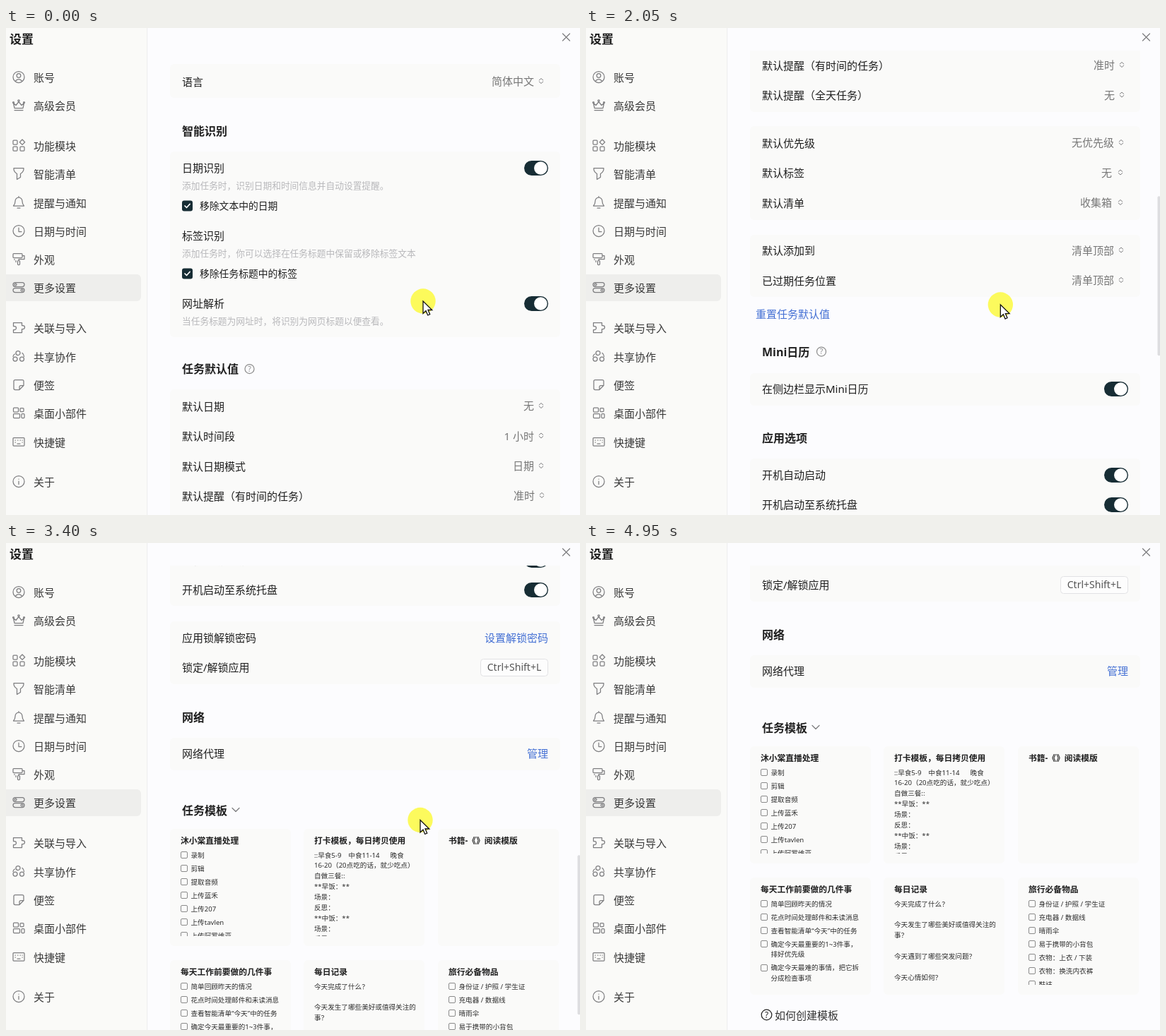
Recreate the animation shown at these times as an HTML page. Size 812 by 690 pixels, loop 5000 ms.

```html
<!DOCTYPE html>
<html lang="zh-CN">
<head>
<meta charset="utf-8">
<style>
html, body { margin: 0; width: 100%; height: 100%; overflow: hidden; background: #fcfcfe; }
svg { display: block; }
text { font-family: "Noto Sans", "Noto Sans CJK SC", "Noto Sans CJK", sans-serif; white-space: pre; }
.line { fill: none; stroke: #7e7e80; stroke-width: 1.25; stroke-linecap: round; stroke-linejoin: round; }
</style>
</head>
<body>
<svg id="stage" width="812" height="690" viewBox="0 0 812 690"></svg>
<script>
const INK = '#1f1f1f', GREY = '#777', PALE = '#b8b8bb', BLUE = '#4470d4', DARK = '#172d35', CARD = '#fafaf9';

// y is the visual middle of the text line; baselines sit on whole pixels
const text = (x, y, str, { size = 15, fill = INK, weight = 400, anchor = 'start' } = {}) =>
  `<text x="${x}" y="${Math.round(y + size * 0.38)}" font-size="${size}" fill="${fill}" font-weight="${weight}" text-anchor="${anchor}">${str}</text>`;
const rect = (x, y, w, h, r, fill, extra = '') =>
  `<rect x="${x}" y="${y}" width="${w}" height="${h}" rx="${r}" fill="${fill}" ${extra}/>`;
const line = (x, y, d, style = '') =>
  `<path class="line" transform="translate(${x} ${y})" d="${d}" style="${style}"/>`;
const ring = (x, y, r) => `M${x - r} ${y}a${r} ${r} 0 1 0 ${2 * r} 0a${r} ${r} 0 1 0 ${-2 * r} 0z`;
const box = (x, y, w, h) => `M${x + 1} ${y}h${w - 2}q1 0 1 1v${h - 2}q0 1 -1 1h${2 - w}q-1 0 -1 -1v${2 - h}q0 -1 1 -1z`;
const pill = y => `M-5 ${y - 3}H5a3 3 0 0 1 0 6H-5a3 3 0 0 1 0 -6z`;

const menu = [
  [70, '账号', ring(0, 0, 8) + ring(0, -2, 2.8) + 'M-5 6Q0 0 5 6'],
  [110, '高级会员', 'M-7.5 -3L-4 0 0 -5 4 0 7.5 -3 6 4H-6zM-6 7H6' + ring(0, -6.5, 1.2) + ring(-7.5, -4, 1) + ring(7.5, -4, 1)],
  [167, '功能模块', box(-8, -7.5, 6, 6) + box(-8, 1.5, 6, 6) + box(2, 1.5, 6, 6) + 'M5 -8.5l3.7 3.7 -3.7 3.7 -3.7 -3.7z'],
  [207, '智能清单', 'M-7 -8H7Q7.5 -3 2.5 0V5L-2.5 8V0Q-7.5 -3 -7 -8z'],
  [248, '提醒与通知', 'M-7.5 4.5H7.5Q5 2 5 -2A5 5.5 0 0 0 -5 -2Q-5 2 -7.5 4.5zM-2 7.5H2M0 -7.5V-9'],
  [288, '日期与时间', ring(0, 0, 8) + 'M0 -4.5V1H4'],
  [328, '外观', box(-8, -8, 13, 6) + 'M5 -5H8V0H0V2' + box(-1.5, 2, 3, 6) + 'M-6 0V1M-4 2V4'],
  [368, '更多设置', pill(-4) + pill(4) + ring(-4.5, -4, 1.5) + ring(4.5, 4, 1.5)],
  [425, '关联与导入', 'M-7.5 -7H4.5V-3H6a2 2 0 0 1 0 5H4.5V7H-7.5V3H-6a2 2 0 0 0 0 -5H-7.5z'],
  [466, '共享协作', ring(-1, -5, 3) + ring(-5, 3.5, 3) + ring(4.5, 3.5, 3) + 'M5 -5Q7.5 -3 7.5 0M-8 0Q-7.5 -3 -5.5 -3.5'],
  [506, '便签', 'M-5 -7H5q2 0 2 2V1L1 7H-5q-2 0 -2 -2V-5q0 -2 2 -2zM7 1H3q-2 0 -2 2V7'],
  [546, '桌面小部件', box(-7.5, -7.5, 7, 6) + box(-7.5, 1, 9, 6) + box(2, -7, 5, 5) + box(4, 1, 4, 6)],
  [587, '快捷键', box(-8, -6, 16, 11.5) + 'M-5 -2.5H-4.5M-1.5 -2.5H-1M2 -2.5H2.5M5 -2.5H5.3M-5 0.5H-4.5M5 0.5H5.3M-2 2.5H2'],
  [643, '关于', ring(0, 0, 8) + 'M0 -0.5V4M0 -3.5V-3.3'],
];
const sidebar = rect(0, 0, 199, 690, 0, '#fafaf8') + rect(199, 0, 1.2, 690, 0, '#efeff0') +
  rect(-8, 349, 199, 38, 6, '#eeeeec') + text(5, 16, '设置', { size: 17, weight: 700 }) +
  menu.map(([y, name, icon]) => line(18, y - 0.5, icon) + text(39, y, name, { fill: '#383838' })).join('');

// Settings page, laid out in unscrolled coordinates
const panel = (top, bottom) => rect(232, top, 552, bottom - top, 6, CARD);
const heading = (y, str) => text(249, y, str, { size: 16, weight: 700 });
const help = (x, y, color = '#8e8e8e', r = 6.5) => line(x, y, ring(0, 0, r), `stroke:${color}`) +
  text(x, y, '?', { size: r * 1.6, fill: color, anchor: 'middle' });
const toggle = y => rect(733, y - 10.5, 34, 21, 10.5, DARK) + `<circle cx="756.3" cy="${y}" r="9.3" fill="#fff"/>`;
const label = (y, str) => text(249, y, str);
const note = (y, str) => text(249, y, str, { size: 12.73, fill: PALE });
const link = (y, str) => text(767, y, str, { fill: BLUE, anchor: 'end' });
const check = (y, str) => rect(249, y - 7.5, 15, 15, 3, DARK) +
  line(256.5, y, 'M-3.5 0L-1 2.5 3.5 -2.5', 'stroke:#fff;stroke-width:1.7') + text(274, y, str, { size: 13.8 });
const choice = (y, str, value, shift = 0) => label(y, str) +
  text(747 + shift, y - 0.5, value, { fill: GREY, anchor: 'end' }) +
  line(757 + Math.sign(shift), y - 1, 'M-2.8 -1L0 -3.5 2.8 -1M-2.8 1L0 3.5 2.8 1', 'stroke-width:1');

const settings = [
  panel(51, 99), choice(76, '语言', '简体中文'),
  heading(146, '智能识别'), panel(175, 438),
  label(198, '日期识别'), toggle(198.5), note(223, '添加任务时，识别日期和时间信息并自动设置提醒。'), check(252, '移除文本中的日期'),
  label(294, '标签识别'), note(319, '添加任务时，你可以选择在任务标题中保留或移除标签文本'), check(348, '移除任务标题中的标签'),
  label(390.5, '网址解析'), toggle(390.5), note(415, '当任务标题为网址时，将识别为网页标题以便查看。'),
  heading(483, '任务默认值'), help(344.5, 483), panel(512, 729),
  choice(536, '默认日期', '无'), choice(578.5, '默认时间段', '1 小时'), choice(621, '默认日期模式', '日期'),
  choice(663, '默认提醒（有时间的任务）', '准时', 1), choice(705.5, '默认提醒（全天任务）', '无', 1),
  panel(749, 882), choice(773, '默认优先级', '无优先级'), choice(815.5, '默认标签', '无', -3), choice(858, '默认清单', '收集箱', -3),
  panel(903, 991), choice(925.5, '默认添加到', '清单顶部'), choice(968, '已过期任务位置', '清单顶部'),
  text(240, 1015.5, '重置任务默认值', { fill: BLUE }),
  heading(1068.5, 'Mini日历'), help(333, 1068.5), panel(1099, 1145), label(1121.5, '在侧边栏显示Mini日历'), toggle(1121.5),
  heading(1191, '应用选项'), panel(1220, 1308),
  label(1243.5, '开机自动启动'), toggle(1243.5), label(1285.5, '开机启动至系统托盘'), toggle(1285.5),
  panel(1330, 1419), label(1353.5, '应用锁解锁密码'), link(1353.5, '设置解锁密码'), label(1395.5, '锁定/解锁应用'),
  rect(671.5, 1383.5, 95, 24, 4, '#fdfdfd', 'stroke="#e2e2e4"'),
  text(719, 1395, 'Ctrl+Shift+L', { size: 14, fill: '#555', anchor: 'middle' }),
  heading(1465.5, '网络'), panel(1495, 1541), label(1517.5, '网络代理'), link(1517.5, '管理'),
  heading(1597.5, '任务模板'), line(325, 1597, 'M-5 -2.5L0 2.5 5 -2.5'),
  help(255.5, 2004.5, '#222', 7.3), text(267, 2005.5, '如何创建模板', { fill: '#333' }),
].join('');

// Templates: "-" starts a checkbox item
const templates = [
  ['沐小棠直播处理', '-录制|-剪辑|-提取音频|-上传蓝禾|-上传207|-上传tavlen|-上传阿罗维亚'],
  ['打卡模板，每日拷贝使用', '::早食5-9    中食11-14      晚食|16-20（20点吃的话，就少吃点）|自做三餐::|**早饭：**|场景：|反思：|**中饭：**|场景：|反思：'],
  ['书籍-《》阅读模版', ''],
  ['每天工作前要做的几件事', '-简单回顾昨天的情况|-花点时间处理邮件和未读消息|-查看智能清单“今天”中的任务|-确定今天最重要的1~3件事，|排好优先级|-确定今天最难的事情，把它拆|分成检查事项'],
  ['每日记录', '今天完成了什么？||今天发生了哪些美好或值得关注的|事？||今天遇到了哪些突发问题？||今天心情如何？'],
  ['旅行必备物品', '-身份证 / 护照 / 学生证|-充电器 / 数据线|-晴雨伞|-易于携带的小背包|-衣物：上衣 / 下装|-衣物：换洗内衣裤|-鞋袜'],
].map(([title, body], i) => ({ title, body, x: [232, 421, 611][i % 3], y: i < 3 ? 1624 : 1810 }));

function templateCard({ title, body, x, y }) {
  const lines = body.split('|'), isList = body[0] === '-';
  let ly = 37, inner = '';
  lines.forEach((str, i) => {
    const item = str[0] === '-';
    if (i) ly += isList && item ? 19 : 14.85;
    if (item) inner += rect(15.5, Math.round(ly) - 4.5, 9, 9, 1.5, 'none', 'stroke="#8a8a8a"');
    inner += text(isList ? 29.5 : 15, ly, item ? str.slice(1) : str, { size: 9.6, fill: '#2c2c2c' });
  });
  return `<g transform="translate(${x} ${y})">` + rect(0, 0, 171, 166, 6, CARD) +
    `<g class="hover" visibility="hidden">` + rect(-1.5, -1.5, 174, 169, 6, '#e9e9e9') +
    [-4.5, 0, 4.5].map(d => `<circle cx="${157.5 + d}" cy="11.5" r="1.3" fill="#777"/>`).join('') + '</g>' +
    text(15, 16.5, title, { size: 11.75, weight: 700 }) +
    `<svg width="171" height="152">${inner}</svg></g>`;
}

const stage = document.getElementById('stage');
stage.innerHTML = rect(0, 0, 812, 690, 0, '#fcfcfe') + sidebar +
  `<svg y="32" width="812" height="658"><g id="page">${settings}${templates.map(templateCard).join('')}</g></svg>` +
  line(792.5, 13, 'M-5 -5L5 5M5 -5L-5 5') +
  rect(808.5, 0, 4, 226, 2, '#dddde0', 'id="thumb"') +
  `<g id="cursor"><circle r="17.7" fill="#fdfa30" fill-opacity=".78"/>
   <path d="M0 0V17.5L4 13.7 6.7 20 9.7 18.7 7 12.5H12.7z" fill="#fff" stroke="#111" stroke-width="1.3"/></g>`;

const [page, thumb, cursor] = ['page', 'thumb', 'cursor'].map(id => document.getElementById(id));
const hovers = [...document.querySelectorAll('.hover')];

// Every wheel notch eases the page one step further
const LOOP = 5000, FRAME = 50, NOTCH = 101.6, NOTCH_MS = 130, MAX_SCROLL = 1336;
const notches = [340, 770, 920, 1170, 1665, 1915, 2265, 2420, 2610, 2910, 3030, 3265, 3440, 3710];
const path = [[0, 590, 387], [350, 590, 387], [700, 588.5, 388], [1500, 587, 391], [2300, 586, 392.5], [3900, 586, 392.5],
  [4050, 661, 483.5], [4250, 680, 570], [4500, 560, 590], [4850, 530, 715], [LOOP, 530, 715]];

const clamp = v => Math.min(1, Math.max(0, v));
const ease = p => p * p * (3 - 2 * p);
const scrollAt = t => Math.min(MAX_SCROLL, Math.round(
  notches.reduce((sum, start) => sum + NOTCH * ease(clamp((t - start) / NOTCH_MS)), 0)));

function cursorAt(t) {
  const i = path.findIndex(([end]) => end > t);
  const [t0, x0, y0] = path[i - 1], [t1, x1, y1] = path[i];
  const p = (t - t0) / (t1 - t0);
  return [x0 + (x1 - x0) * p, y0 + (y1 - y0) * p];
}

function draw(now) {
  const t = Math.floor(now % LOOP / FRAME) * FRAME;
  const scroll = scrollAt(t), [x, y] = cursorAt(t);
  page.setAttribute('transform', `translate(0 ${-32 - scroll})`);
  cursor.setAttribute('transform', `translate(${x} ${y})`);
  thumb.setAttribute('y', 34 + scroll * 0.335);
  thumb.setAttribute('opacity', clamp((t - 300) / 150) * clamp((4700 - t) / 300));
  templates.forEach((c, i) => {
    const inside = x > c.x && x < c.x + 171 && y + scroll > c.y && y + scroll < c.y + 166 && y < 690;
    hovers[i].setAttribute('visibility', inside ? 'visible' : 'hidden');
  });
}

const begin = performance.now();
(function tick() {
  draw(performance.now() - begin);
  requestAnimationFrame(tick);
})();
</script>
</body>
</html>
```
